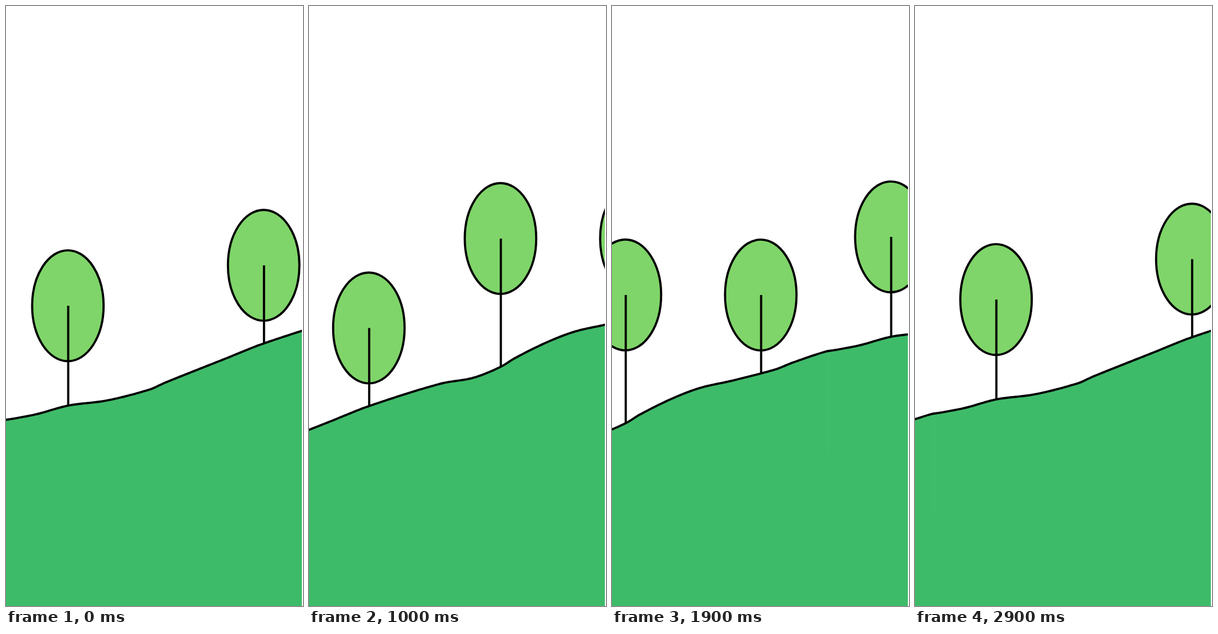
An HTML page for the animation above (3000 ms loop, 527 by 1063 pixels).

```html
<!DOCTYPE html>
<html lang="en">
<head>
<meta charset="utf-8">
<title>Hillside</title>
<style>
  html, body { margin: 0; width: 100%; height: 100%; overflow: hidden; background: #fff; }
  svg { display: block; width: 527px; height: 1063px; }
  .line { fill: none; stroke: #000; stroke-width: 3.9; }
  .hill { fill: #3ebb69; }
  .crown { fill: #7fd569; stroke: #000; stroke-width: 3.9; }
  .seam { stroke: #fff; stroke-opacity: .05; }
</style>
</head>
<body>
<svg viewBox="0 0 527 1063">
  <clipPath id="view"><rect width="525" height="1063"/></clipPath>
  <g clip-path="url(#view)"><g id="world"></g></g>
</svg>
<script>
// One stretch of hillside; it repeats SPAN to the right and RISE higher.
const SPAN = 1052, RISE = 333;
const STEPS = 30, STEP_MS = 100, STEP_X = 35.09, STEP_Y = 11.1;

// Bends of the ridge within one stretch
const bends = [
  [12, 731.3], [55, 723], [110, 708], [180, 698.7], [255, 679.4], [283, 667],
  [388, 625.3], [457.5, 597.8], [583, 558.5], [643, 547.5], [691, 528.3],
  [717, 512.5], [773, 484.8], [823, 465.7], [880, 452.8], [957, 432.8],
  [987, 421], [1045, 401.5]
];

// Trees: x and trunk length
const trees = [[109.8, 177], [457.2, 138.5], [690.8, 227.5], [931, 139]];

function bend(i) {
  const k = Math.floor(i / bends.length), [x, y] = bends[i - k * bends.length];
  return [x + k * SPAN, y - k * RISE];
}

function slope(i) {
  const [x0, y0] = bend(i - 1), [x1, y1] = bend(i + 1);
  return (y1 - y0) / (x1 - x0);
}

// Ridge height at x: a smooth cubic between neighbouring bends
function ridge(x) {
  let i = Math.floor(x / SPAN) * bends.length;
  while (bend(i)[0] <= x) i++;
  const [x0, y0] = bend(i - 1), [x1, y1] = bend(i);
  const w = x1 - x0, t = (x - x0) / w, u = 1 - t;
  return y0 * u * u * (1 + 2 * t) + y1 * t * t * (1 + 2 * u)
    + w * t * u * (u * slope(i - 1) - t * slope(i));
}

function tree(x, trunk) {
  const foot = ridge(x), cy = foot - trunk;
  return `<ellipse class="crown" cx="${x}" cy="${cy}" rx="63.4" ry="98.2"/>
    <path class="line" d="M${x + 0.6},${cy}V${foot}"/>`;
}

const repeat = draw => [-1, 0, 1].map(k => draw(k * SPAN)).join('');

const points = [];
for (let x = -20; x < 1.6 * SPAN; x += 4) points.push([x, ridge(x)]);
const curve = 'M' + points.join('L');

const world = document.getElementById('world');
world.innerHTML =
  `<path class="hill" d="${curve}V2000H-20Z"/>` +
  repeat(dx => `<path class="seam" d="M${dx - 0.5},${ridge(dx)}v180"/>`) +
  `<path class="line" d="${curve}"/>` +
  repeat(dx => trees.map(([x, trunk]) => tree(x + dx, trunk)).join(''));

// The camera climbs in whole pixels.
function frame(now) {
  const n = Math.floor(now / STEP_MS) % STEPS;
  world.setAttribute('transform',
    `translate(${-Math.round(n * STEP_X)} ${Math.round(n * STEP_Y)})`);
  requestAnimationFrame(frame);
}
frame(0);
</script>
</body>
</html>
```
